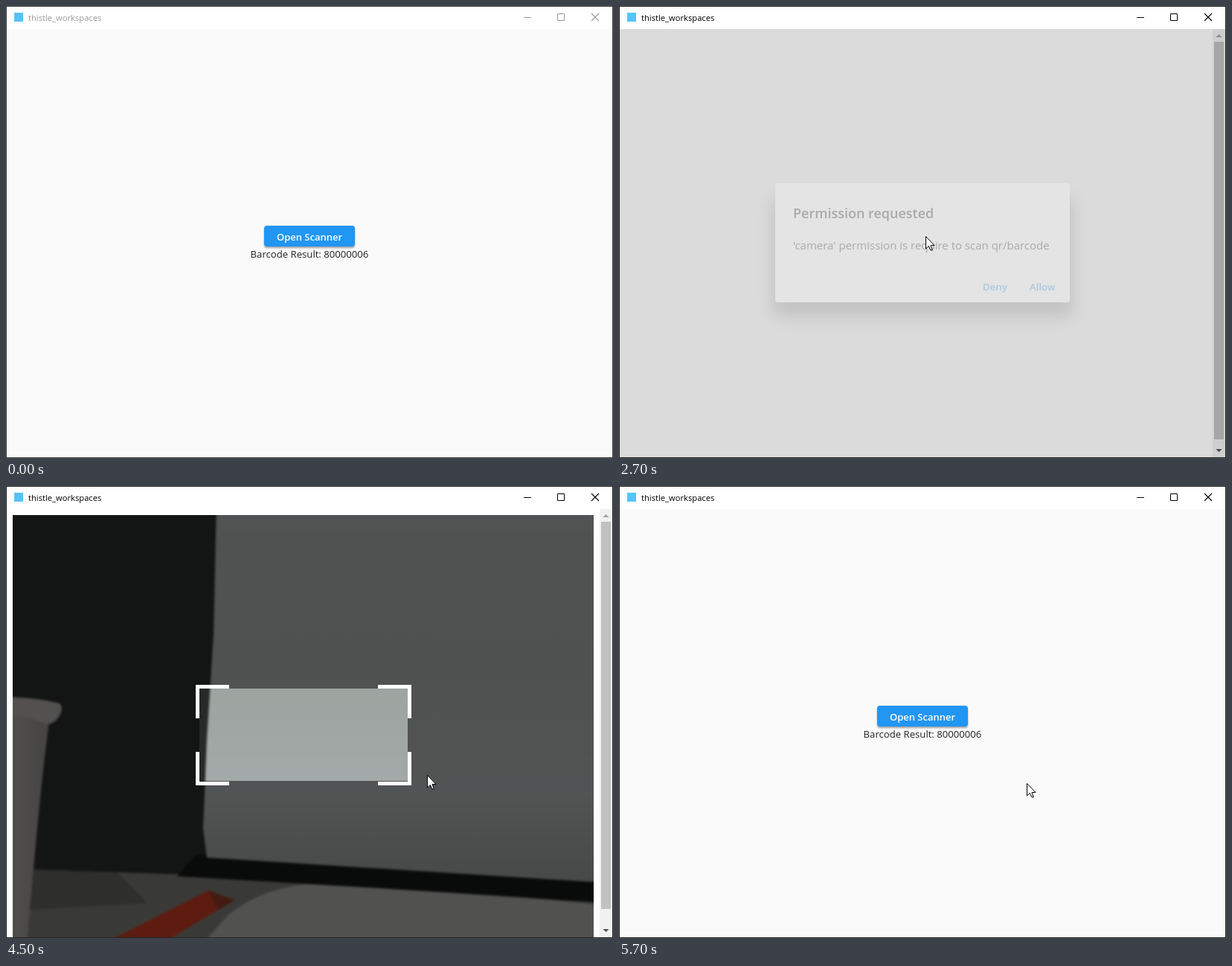
An HTML page for the animation above (5800 ms loop, 816 by 607 pixels).

```html
<!DOCTYPE html>
<html lang="en">
<head>
<meta charset="utf-8">
<title>Scanner demo</title>
<style>
  html, body { margin: 0; width: 100%; height: 100%; overflow: hidden; background: #fff; }
  svg { display: block; width: 816px; height: 607px; font-family: "Open Sans", "Noto Sans", sans-serif; }
  text { white-space: pre; }
  .strong { font-weight: 600; }
  .label { font: 17px "Liberation Sans", Arial, sans-serif; fill: #4b4d4a; }
</style>
</head>
<body>
<svg viewBox="0 0 816 607" xmlns="http://www.w3.org/2000/svg">
  <defs>
    <clipPath id="videoClip"><rect x="9" y="39" width="781" height="567"/></clipPath>
    <clipPath id="buttonClip"><rect x="347" y="295" width="122" height="28" rx="4"/></clipPath>
    <clipPath id="bodyClip"><rect x="1" y="31" width="814" height="575"/></clipPath>
    <linearGradient id="sheetFill" x1="0" y1="0" x2="0" y2="1">
      <stop offset="0" stop-color="#a2a4a6"/>
      <stop offset=".45" stop-color="#9da39f"/>
      <stop offset=".75" stop-color="#a2a9a8"/>
      <stop offset="1" stop-color="#8e928f"/>
    </linearGradient>
    <linearGradient id="cupFill" x1="0" y1="0" x2="1" y2="0">
      <stop offset="0" stop-color="#aba9a6"/>
      <stop offset="1" stop-color="#8a8886"/>
    </linearGradient>
    <filter id="soft" x="-20%" y="-30%" width="140%" height="180%"><feGaussianBlur stdDeviation="11"/></filter>
    <filter id="tight" x="-10%" y="-20%" width="120%" height="150%"><feGaussianBlur stdDeviation="1.3"/></filter>
  </defs>

  <rect width="816" height="607" fill="#fff"/>
  <rect x="1" y="31" width="814" height="575" fill="#fafafa"/>

  <g id="home">
    <rect x="347" y="297" width="122" height="28" rx="4" fill="#000" opacity=".35" filter="url(#tight)"/>
    <rect x="347" y="295" width="122" height="28" rx="4" fill="#2196f3"/>
    <circle id="ripple" cx="398" cy="307" fill="#fff" opacity=".24" clip-path="url(#buttonClip)"/>
    <text class="strong" x="408" y="315" font-size="13" fill="#fff" text-anchor="middle">Open Scanner</text>
    <text x="408" y="338" font-size="13.15" fill="#212121" text-anchor="middle">Barcode Result: 80000006</text>
  </g>

  <g id="page">
    <rect x="1" y="31" width="814" height="575" fill="#fff"/>
    <g id="video" clip-path="url(#videoClip)">
      <g id="scene">
        <rect x="-20" y="0" width="860" height="640" fill="#262928"/>
        <g id="desk">
          <path d="M-20 508L30 515L250 522L500 536L840 560V660H-20Z" fill="#73756f"/>
          <path d="M-20 508L30 515L150 519L190 560L-20 572Z" fill="#5c5d57"/>
          <path d="M240 640L300 575Q350 536 420 534L640 548L840 566V660Z" fill="#a3a3a0"/>
          <path d="M120 620L272 543L308 556L200 620Z" fill="#bd3822"/>
          <path d="M272 543L308 556L285 569Z" fill="#8a3526"/>
          <path d="M255 495L840 528V562L500 540L230 524Z" fill="#131514"/>
        </g>
        <path id="sheet" fill="url(#sheetFill)"/>
        <g id="cup">
          <path d="M-20 292L58 318Q46 400 26 640H-20Z" fill="url(#cupFill)"/>
          <path d="M-20 283Q40 283 72 292Q80 300 66 316Q58 322 50 318Q20 306 -20 304Z" fill="#a5a3a1"/>
        </g>
        <g id="details">
          <ellipse cx="563" cy="138" rx="49" ry="51" fill="#8b8d8b"/>
          <ellipse cx="561" cy="129" rx="42.5" ry="44" fill="#2b3030"/>
          <text class="label" transform="translate(308 162) rotate(-4)" font-size="18">60010#C</text>
          <text class="label" transform="translate(312 324) rotate(-3)">80000006</text>
          <g id="flipped"></g>
        </g>
      </g>
      <path d="M9 39H790V607H9ZM260 272V396H540V272Z" fill="#000" fill-opacity=".5" fill-rule="evenodd"/>
      <path d="M257.5 312V269.5H300M500 269.5H542.5V312M542.5 357V399.5H500M300 399.5H257.5V357" fill="none" stroke="#fff" stroke-width="5"/>
    </g>
    <rect x="798" y="31" width="17" height="575" fill="#f1f1f1"/>
    <rect id="thumb" x="800" y="48" width="13" fill="#c1c1c1"/>
    <path d="M802.5 42L806.5 38L810.5 42Z" fill="#a3a3a3"/>
    <path d="M802.5 595L806.5 599L810.5 595Z" fill="#505050"/>
  </g>

  <rect id="scrim" x="1" y="31" width="814" height="575" fill="#000"/>

  <g id="dialog" clip-path="url(#bodyClip)">
    <rect x="206" y="258" width="404" height="160" rx="8" fill="#000" opacity=".42" filter="url(#soft)"/>
    <rect x="210" y="238" width="396" height="160" rx="4" fill="#fff"/>
    <text class="strong" x="234" y="285" font-size="18" fill="#212121">Permission requested</text>
    <text x="234" y="327" font-size="15" fill="#212121">'camera' permission is require to scan qr/barcode</text>
    <g class="strong" font-size="13.2" fill="#2196f3">
      <text x="489" y="382">Deny</text>
      <text x="552" y="382">Allow</text>
    </g>
  </g>

  <g id="titlebar">
    <rect x="11" y="9" width="12" height="12" fill="#54c5f8"/>
    <text x="30" y="20" font-size="11.2" fill="currentColor">thistle_workspaces</text>
    <path d="M696 15.5H706M741.5 10.5H750.5V19.5H741.5Z" fill="none" stroke="currentColor"/>
    <path d="M787 10L797 20M797 10L787 20" fill="none" stroke="currentColor" stroke-width="1.1"/>
  </g>
  <rect id="frame" x=".5" y=".5" width="815" height="606" fill="none"/>

  <path id="cursor" d="M.5 .5V17L4.3 13.4L7 19H9.3L7 12.5H12Z" fill="#fff" stroke="#000" stroke-linejoin="round"/>
</svg>

<script>
const LOOP = 5800, STEP = 100;
const $ = id => document.getElementById(id);
const mix = (a, b, k) => a + (b - a) * k;
const show = (id, on) => $(id).style.display = on ? "" : "none";
const set = (id, name, value) => $(id).setAttribute(name, value);

// Each track is a list of [time, ...values], eased between neighbours.
const cursorPath = [
  [200, 40, 0], [700, 580, 495], [1100, 317, 316], [1200, 317, 316],
  [1600, 377, 289], [1800, 377, 289], [2000, 398, 307], [2600, 398, 307],
  [3100, 537, 324], [3200, 537, 324], [3500, 578, 378], [3600, 578, 374],
  [4200, 578, 374], [4500, 566, 388], [5000, 566, 388], [5200, 548, 399]
];
const scrimTrack = [
  [2200, 0], [2400, .5], [2500, 0], [2600, 0], [2900, .54], [3900, .54], [4200, 0]
];
const dialogTrack = [[2600, 0], [2900, 1], [3900, 1], [4200, 0]];
const panTrack = [[4500, 0], [4900, .8], [5000, .8], [5200, 1]];

function sample(track, t) {
  if (t <= track[0][0]) return track[0].slice(1);
  const i = track.findIndex(key => key[0] >= t);
  if (i < 0) return track[track.length - 1].slice(1);
  const a = track[i - 1], b = track[i];
  const u = (t - a[0]) / (b[0] - a[0]);
  const k = u * u * (3 - 2 * u);
  return a.slice(1).map((v, j) => mix(v, b[j + 1], k));
}

// Outline of the paper before and after the camera pans up along it.
const sheetLow = [[283, 25], [279, 200], [270, 340], [265, 460], [270, 499], [840, 535], [840, 25]];
const sheetHigh = [[160, 25], [178, 220], [188, 360], [197, 520], [205, 749], [840, 785], [840, 25]];

$("flipped").innerHTML = [["C", 697, 181], ["B", 711, 389], ["A", 725, 563]].map(([c, x, y]) =>
  `<text class="label" text-anchor="end" transform="translate(${x} ${y}) rotate(177)">60010#${c}#1</text>`).join("");

function drawScene(k) {
  const outline = sheetLow.map(([x, y], i) =>
    [mix(x, sheetHigh[i][0], k), mix(y, sheetHigh[i][1], k)]);
  set("sheet", "d", "M" + outline.join("L") + "Z");
  set("desk", "transform", `translate(${-40 * k} ${250 * k})`);
  set("cup", "transform", `translate(${-110 * k} ${250 * k})`);
  set("details", "transform", `translate(${70 * (1 - k)} ${-250 * (1 - k)})`);
  set("details", "opacity", k);
  $("scene").style.filter = `blur(${mix(1.6, .4, k)}px)`;
}

function render(time) {
  const t = Math.floor(time / STEP) * STEP;
  const active = t >= 1300;
  const pageOpen = t >= 2500 && t < 5600;
  const videoOn = t >= 4400;

  $("titlebar").style.color = active ? "#000" : "#999";
  set("frame", "stroke", active ? "#242424" : "#404040");

  show("home", t < 2500 || t >= 5700);
  set("ripple", "r", t >= 2000 && t < 2500 ? Math.min(95, (t - 1900) * .3) : 0);

  show("page", pageOpen);
  show("video", videoOn);
  set("thumb", "height", videoOn ? 520 : 534);
  if (videoOn) drawScene(sample(panTrack, t)[0]);

  set("scrim", "opacity", sample(scrimTrack, t)[0]);
  const fade = sample(dialogTrack, t)[0];
  show("dialog", fade > 0);
  set("dialog", "opacity", fade);

  show("cursor", t >= 200);
  const [x, y] = sample(cursorPath, t).map(Math.round);
  set("cursor", "transform", `translate(${x} ${y})`);
}

const start = performance.now();
function tick() {
  render((performance.now() - start) % LOOP);
  requestAnimationFrame(tick);
}
tick();
</script>
</body>
</html>
```
